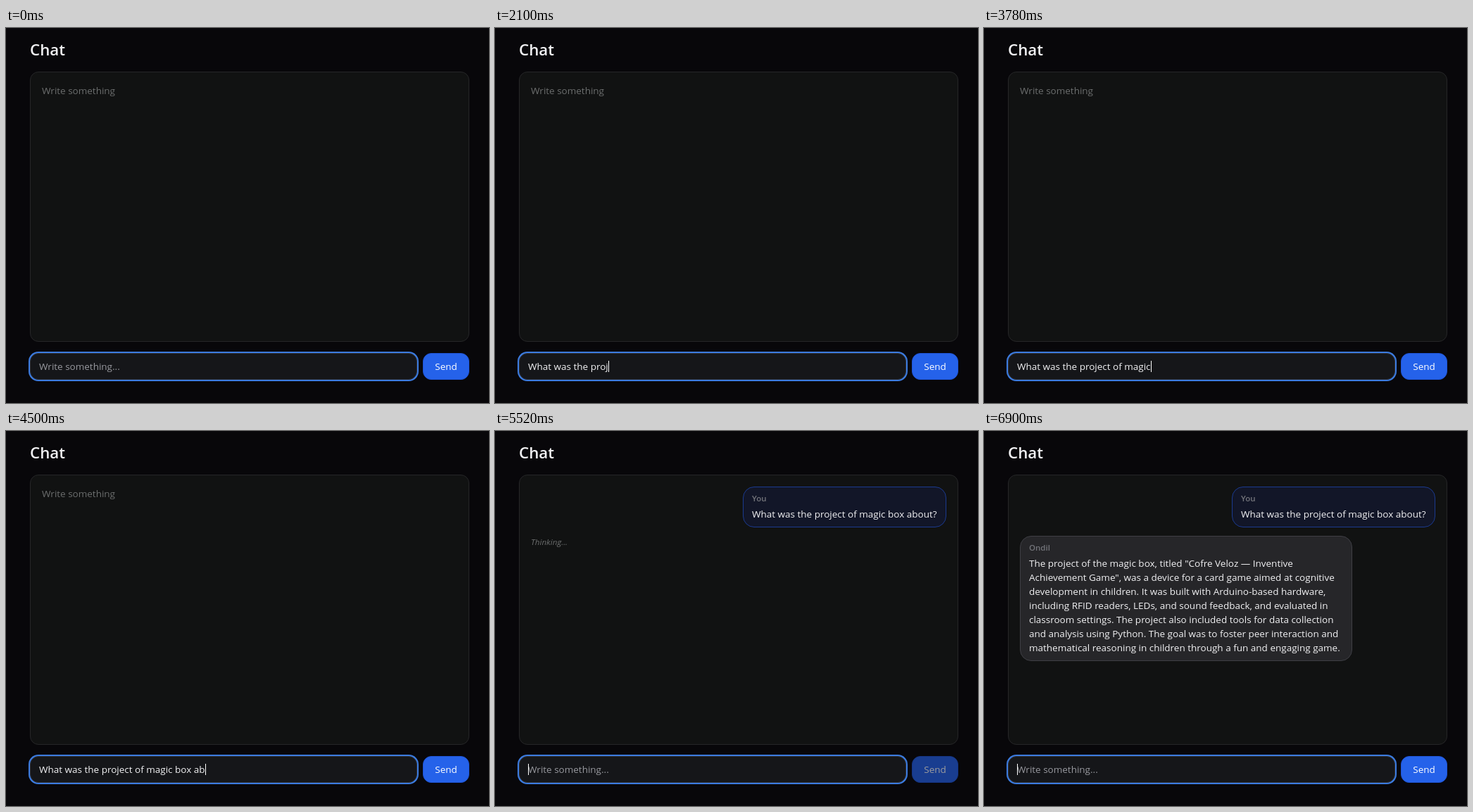
An HTML page that plays this animation: 686 by 533 pixels, repeating every 7440 ms.

```html
<!DOCTYPE html>
<html lang="en">
<head>
<meta charset="utf-8">
<title>Chat</title>
<style>
  html, body { margin: 0; width: 100%; height: 100%; overflow: hidden; background: #08070a; }
  body { position: relative; font: 13.5px/20px "Open Sans", "Noto Sans", sans-serif; color: #f1f1f3; white-space: pre; }
  body * { box-sizing: border-box; }
  h1, .panel, .bubble, .note, .field, .send { position: absolute; margin: 0; }
  h1 { left: 34px; top: 15px; font-size: 22.3px; line-height: 32px; font-weight: 600; }
  .panel { left: 34px; top: 62px; width: 624px; height: 384px; border: 1px solid #262628; border-radius: 12px; background: #111212; }
  .note { left: 51px; color: #6c6e6e; }
  #hint { top: 79px; }
  #thinking { top: 150px; font-size: 11.6px; line-height: 16px; font-style: italic; }
  .bubble { padding: 8px 12px; border: 1px solid; border-radius: 16px; }
  .bubble b { display: block; margin-bottom: 4px; font-size: 11.5px; line-height: 16px; font-weight: 600; color: #74757b; }
  #question { left: 352px; top: 79px; width: 289px; height: 58px; background: #121628; border-color: #1b3a8f; }
  #answer { left: 51px; top: 149px; width: 472px; height: 178px; background: #262629; border-color: #3f3f45; }
  .field { left: 34px; top: 462px; width: 550px; height: 38px; padding: 8px 12px; border: 1px solid #303238; border-radius: 12px; background: #151619; box-shadow: 0 0 0 2px #3b7be0; }
  #placeholder { position: absolute; left: 12px; color: #97989e; }
  #caret { position: absolute; top: 10px; width: 1px; height: 16px; background: #fff; }
  .send { left: 592px; top: 462px; width: 66px; height: 38px; line-height: 36px; text-align: center; font-weight: 500; color: #fff; background: #2562ea; border: 1px solid #1f55d6; border-radius: 12px; }
</style>
</head>
<body>
<h1>Chat</h1>
<div class="panel"></div>
<div class="note" id="hint">Write something</div>
<div class="bubble" id="question"><b>You</b>What was the project of magic box about?</div>
<div class="note" id="thinking">Thinking...</div>
<div class="bubble" id="answer"><b>Ondil</b>The project of the magic box, titled "Cofre Veloz — Inventive
Achievement Game", was a device for a card game aimed at cognitive
development in children. It was built with Arduino-based hardware,
including RFID readers, LEDs, and sound feedback, and evaluated in
classroom settings. The project also included tools for data collection
and analysis using Python. The goal was to foster peer interaction and
mathematical reasoning in children through a fun and engaging game.</div>
<div class="field"><span id="placeholder">Write something...</span><span id="typed"></span><span id="caret"></span></div>
<div class="send" id="send">Send</div>
<script>
  const LOOP = 7440, SENT = 5460, REPLY = 6120;
  const keys = [
    [360, "W"], [420, "h"], [540, "a"], [600, "t"],
    [1200, " w"], [1320, "a"], [1380, "s"], [1500, " "],
    [1680, "t"], [1740, "h"], [1800, "e"], [1860, " "], [1920, "p"], [1980, "r"], [2040, "o"], [2100, "j"],
    [2460, "ec"], [3000, "t"], [3060, " "], [3120, "o"],
    [3420, "f"], [3480, " "], [3540, "m"], [3660, "ag"], [3780, "ic"], [3900, " "], [4020, "b"], [4080, "o"],
    [4260, "x"], [4320, " "], [4440, "a"], [4500, "b"], [4560, "o"], [4620, "u"], [4680, "t"], [4980, "?"]
  ];
  const el = id => document.getElementById(id);
  const show = (id, on) => { el(id).style.visibility = on ? "visible" : "hidden"; };

  function render(t) {
    const sent = t >= SENT, replied = t >= REPLY;
    const text = sent ? "" : keys.filter(k => k[0] <= t).map(k => k[1]).join("");
    el("typed").textContent = text;
    show("placeholder", !text);
    show("caret", t >= 180 && (t < REPLY || t >= 6900));
    show("hint", !sent);
    show("question", sent);
    show("thinking", sent && !replied);
    show("answer", replied);
    el("send").style.opacity = sent && !replied ? 0.6 : 1;
  }

  const start = performance.now();
  function tick() {
    render((performance.now() - start) % LOOP);
    requestAnimationFrame(tick);
  }
  tick();
</script>
</body>
</html>
```
